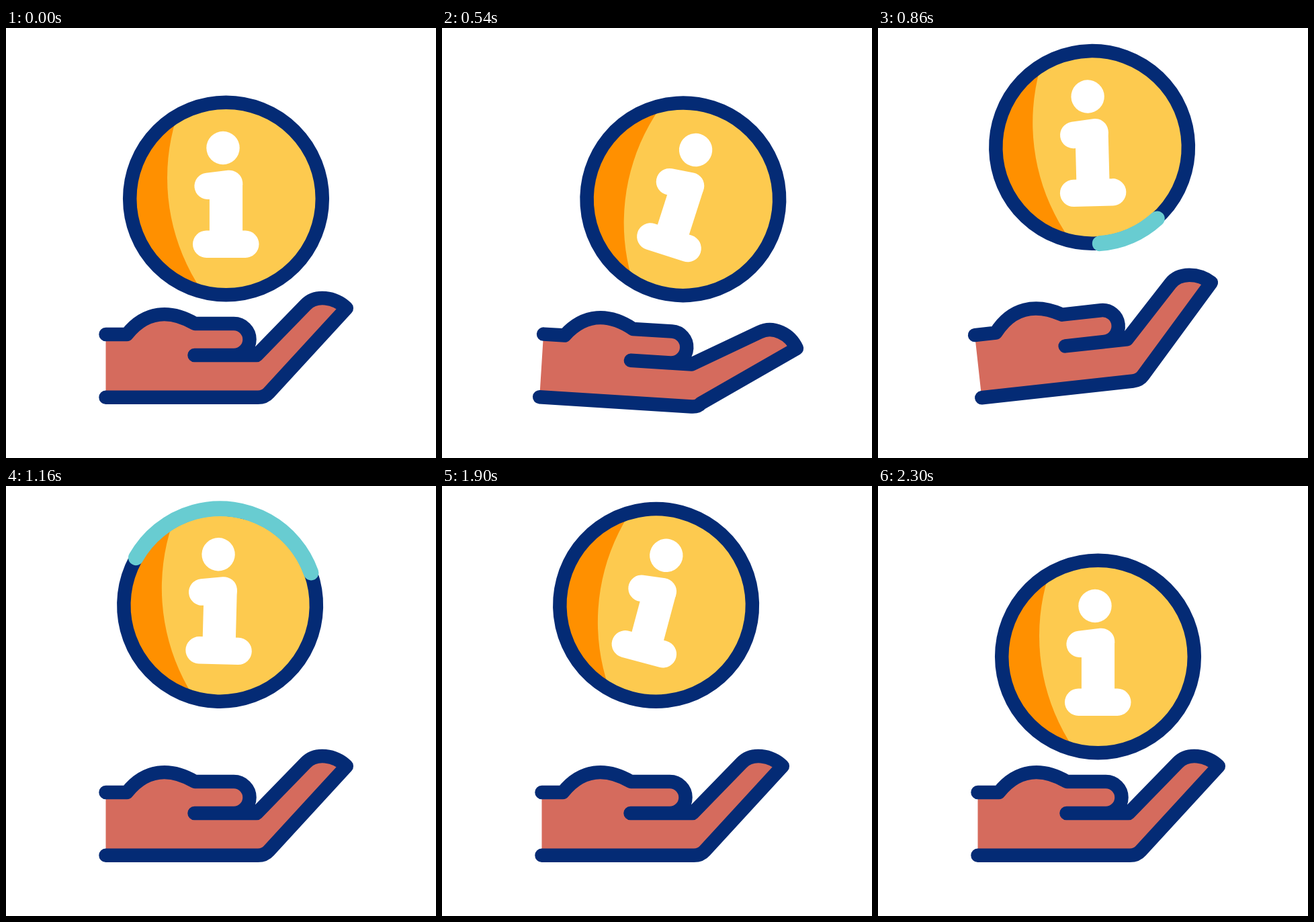
Animation, 640 px wide and 640 px high, one loop 2.32 s. Source, as an HTML page with a canvas:

```html
<!DOCTYPE html>
<html lang="en">
<head>
<meta charset="utf-8">
<title>Information coin</title>
<style>
  html, body { margin: 0; width: 100%; height: 100%; overflow: hidden; background: #fff; }
  canvas { display: block; width: 640px; height: 640px; }
</style>
</head>
<body>
<canvas id="stage" width="640" height="640"></canvas>
<script>
const ctx = document.getElementById('stage').getContext('2d');
const LOOP = 2320, STEP = 20;
const NAVY = '#042b75', SKIN = '#d56b5d', YELLOW = '#fdca4f',
      ORANGE = '#ff9000', TEAL = '#68ccd1', WHITE = '#fff';
const RING = 143.3, LINE = 20.5, TAU = Math.PI * 2;
const rad = deg => deg * Math.PI / 180;

// Eased progress from 0 to 1 between two times.
function ease(t, from, to) {
  const u = Math.min(1, Math.max(0, (t - from) / (to - from)));
  return u * u * (3 - 2 * u);
}

function poseAt(t) {
  const dip = ease(t, 0, 400), toss = ease(t, 400, 700),
        settle = ease(t, 700, 1000), drop = ease(t, 1900, 2300);
  let turn = 20 * dip - 5 * toss - 15 * drop;
  for (let i = 0; i < 4; i++) {
    const swing = ease(t, 700 + 300 * i, 1000 + 300 * i);
    turn += (i % 2 ? 30 : -30) * swing;
  }
  return {
    tilt: 18 * dip - 32 * toss + 14 * settle,
    open: dip - toss,
    x: 327.5 + 64.3 * dip - 73.2 * toss + 8.9 * drop,
    y: 254 + 64.2 * dip - 140.8 * toss + 76.6 * drop,
    turn,
    head: 23 + 360 * ease(t, 703, 1288),
    tail: 23 + 360 * ease(t, 716, 1588)
  };
}

function stroke(path, color, width) {
  ctx.strokeStyle = color;
  ctx.lineWidth = width;
  ctx.stroke(path);
}

function bar(x0, y0, x1, y1, width) {
  const p = new Path2D();
  p.moveTo(x0, y0);
  p.lineTo(x1, y1);
  stroke(p, WHITE, width);
}

function disc(x, y, r, color) {
  ctx.fillStyle = color;
  ctx.beginPath();
  ctx.arc(x, y, r, 0, TAU);
  ctx.fill();
}

function traceThumb(p) {
  p.moveTo(148.5, 456);
  p.lineTo(180, 456);
  p.bezierCurveTo(207, 422, 243, 418, 281, 440);
  p.lineTo(339, 440);
  p.arc(339, 463.5, 23.5, -Math.PI / 2, Math.PI / 2);
}

function traceFingers(p, open) {
  // The fingers bend about the knuckle with a linear map of the offset.
  const bend = (x, y) => [
    373 + x - open * (0.067 * x + 0.625 * y),
    487 + y + open * (0.471 * x - 0.048 * y)
  ];
  p.lineTo(373 - 3 * open, 487);
  p.lineTo(...bend(73, -75));
  p.bezierCurveTo(...bend(88, -90.5), ...bend(116, -87), ...bend(133.8, -70));
  p.lineTo(391 - 4 * open, 543 + 2 * open);
  p.bezierCurveTo(387 - 2 * open, 547.5 + open, 382, 549.8, 375, 549.8);
  p.lineTo(148.5, 549.8);
}

function drawHand({ tilt, open }) {
  ctx.save();
  ctx.translate(156, 497);
  ctx.rotate(rad(tilt));
  ctx.translate(-156, -497);

  const body = new Path2D();
  traceThumb(body);
  traceFingers(body, open);
  ctx.fillStyle = SKIN;
  ctx.fill(body);

  const outline = new Path2D();
  traceThumb(outline);
  outline.lineTo(280.5, 487);
  outline.moveTo(280.5, 487);
  traceFingers(outline, open);
  stroke(outline, NAVY, LINE);
  ctx.restore();
}

function drawLetter() {
  disc(-4.5, -75.5, 24.7, WHITE);
  bar(-27.3, -18.7, 5, -22.5, 39.6);
  bar(-29.3, 67.7, 28.8, 67.7, 40.4);
  ctx.fillRect(-24.6, -22.5, 49.2, 90);
}

function drawCoin({ x, y, turn, head, tail }) {
  ctx.save();
  ctx.translate(x, y);
  ctx.rotate(rad(turn));

  disc(0, 0, RING, ORANGE);
  ctx.save();
  ctx.beginPath();
  ctx.arc(0, 0, RING, 0, TAU);
  ctx.clip();
  disc(212.5, -31, 300, YELLOW);
  ctx.restore();

  drawLetter();

  const ring = new Path2D();
  ring.arc(0, 0, RING, 0, TAU);
  stroke(ring, NAVY, LINE);

  if (head - tail > 0.1) {
    const sweep = new Path2D();
    sweep.arc(0, 0, RING + 0.5, rad(tail), rad(head));
    stroke(sweep, TEAL, 22.8);
  }
  ctx.restore();
}

function draw(t) {
  const pose = poseAt(t);
  ctx.fillStyle = WHITE;
  ctx.fillRect(0, 0, 640, 640);
  ctx.lineCap = ctx.lineJoin = 'round';
  drawHand(pose);
  drawCoin(pose);
}

const start = performance.now();
function tick() {
  const elapsed = performance.now() - start;
  draw(Math.round(elapsed / STEP) * STEP % LOOP);
  requestAnimationFrame(tick);
}
tick();
</script>
</body>
</html>
```
